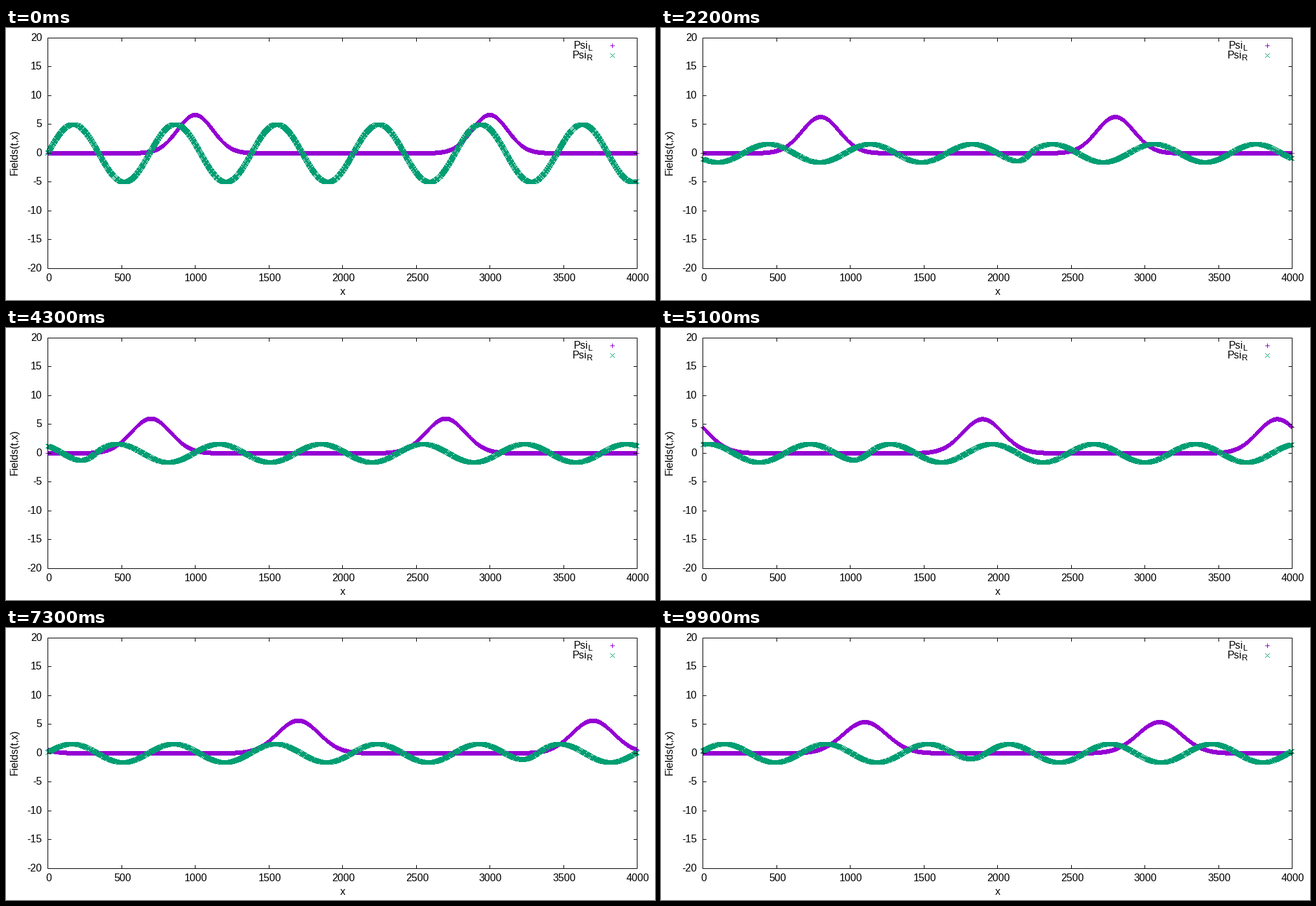
These frames come from a looping animation (1000x420 px, 10000 ms). A matplotlib script:

```python
import numpy as np
import matplotlib.pyplot as plt
from matplotlib.animation import FuncAnimation
from matplotlib.patches import Rectangle

W, H, DPI = 1000, 420, 100
LEFT, RIGHT, TOP, BOTTOM = 64, 972, 15, 371
ZERO = (TOP + BOTTOM) // 2
SX, SY = (RIGHT - LEFT) / 4000, (BOTTOM - TOP) / 40
TIC = 5
PURPLE, GREEN = (148, 0, 211), (0, 158, 115)

# Marker shapes as pixel offsets
ARM = range(-3, 4)
PLUS = [(k, 0) for k in ARM] + [(0, k) for k in ARM]
CROSS = [(k, k) for k in ARM] + [(k, -k) for k in ARM]

# Two advected fields on a periodic grid, upwind scheme
N, COURANT, STEPS = 4000, 0.25, 400
x = np.arange(N)
SIGMA = 120


def bump(centre):
    return np.exp(-0.5 * ((x - centre) / SIGMA) ** 2)


left0 = 2000 / (SIGMA * np.sqrt(2 * np.pi)) * (bump(1000) + bump(3000))
right0 = 5 * np.sin(x / 110)
left_spec, right_spec = np.fft.rfft(left0), np.fft.rfft(right0)
k = 2 * np.pi * np.fft.rfftfreq(N)
gain = 1 - COURANT * (1 - np.exp(-1j * k))


def fields(n):
    if n == 0:
        return left0, right0
    g = gain ** (STEPS * n)
    pair = [np.fft.irfft(left_spec * g.conj(), N),
            np.fft.irfft(right_spec * g, N)]
    return [f / np.mean(np.abs(f)) for f in pair]


def stamp(canvas, px, py, shape, color):
    for dx, dy in shape:
        canvas[py + dy, px + dx] = color


def paint(n):
    canvas = np.full((H, W, 3), 255, np.uint8)
    px = LEFT + np.floor(x * SX + 0.5).astype(int)
    for f, shape, color in zip(fields(n), (PLUS, CROSS), (PURPLE, GREEN)):
        py = ZERO - np.floor(f * SY + 0.5).astype(int)
        stamp(canvas, px, py, shape, color)
    stamp(canvas, 934, 27, PLUS, PURPLE)
    stamp(canvas, 934, 42, CROSS, GREEN)
    return canvas


plt.rcParams["font.family"] = "Liberation Sans"
fig = plt.figure(figsize=(W / DPI, H / DPI), dpi=DPI, facecolor="white")
ax = fig.add_axes([0, 0, 1, 1])
ax.axis("off")
image = ax.imshow(paint(0), extent=(0, W, H, 0), interpolation="nearest",
                  aspect="auto", zorder=1)
ax.set_xlim(0, W)
ax.set_ylim(H, 0)


def bar(x0, y0, x1, y1):
    """Black bar covering the pixels x0..x1, y0..y1 inclusive."""
    ax.add_patch(Rectangle((x0, y0), x1 - x0 + 1, y1 - y0 + 1, fc="black",
                           lw=0, antialiased=False, zorder=3))


def label(px, py, s, size=16, **kw):
    ax.text(px, py, s, fontsize=size * 72 / DPI, color="black",
            va="baseline", zorder=4, **kw)


for y in (TOP, BOTTOM):
    bar(LEFT, y, RIGHT, y)
for v in (LEFT, RIGHT):
    bar(v, TOP, v, BOTTOM)

for value in range(0, 4001, 500):
    px = LEFT + int(value * SX + 0.5)
    bar(px, TOP, px, TOP + TIC)
    bar(px, BOTTOM - TIC, px, BOTTOM)
    label(px + 1.5, 391, str(value), ha="center")

for value in range(-20, 21, 5):
    py = ZERO - int(np.floor(value * SY + 0.5))
    bar(LEFT, py, LEFT + TIC, py)
    bar(RIGHT - TIC, py, RIGHT, py)
    label(55.5, py + 5, str(value), ha="right")

label(518.5, 412, "x", ha="center")
label(17.5, 192, "Fields(t,x)", ha="center", rotation=90,
      rotation_mode="anchor")
label(875, 32, "Psi")
label(897.5, 35, "L", 12.8)
label(873, 47, "Psi")
label(895.5, 50, "R", 12.8)


def update(n):
    image.set_data(paint(n))
    return [image]


anim = FuncAnimation(fig, update, frames=100, interval=100, repeat=True,
                     repeat_delay=0, blit=False)
plt.show()
```
